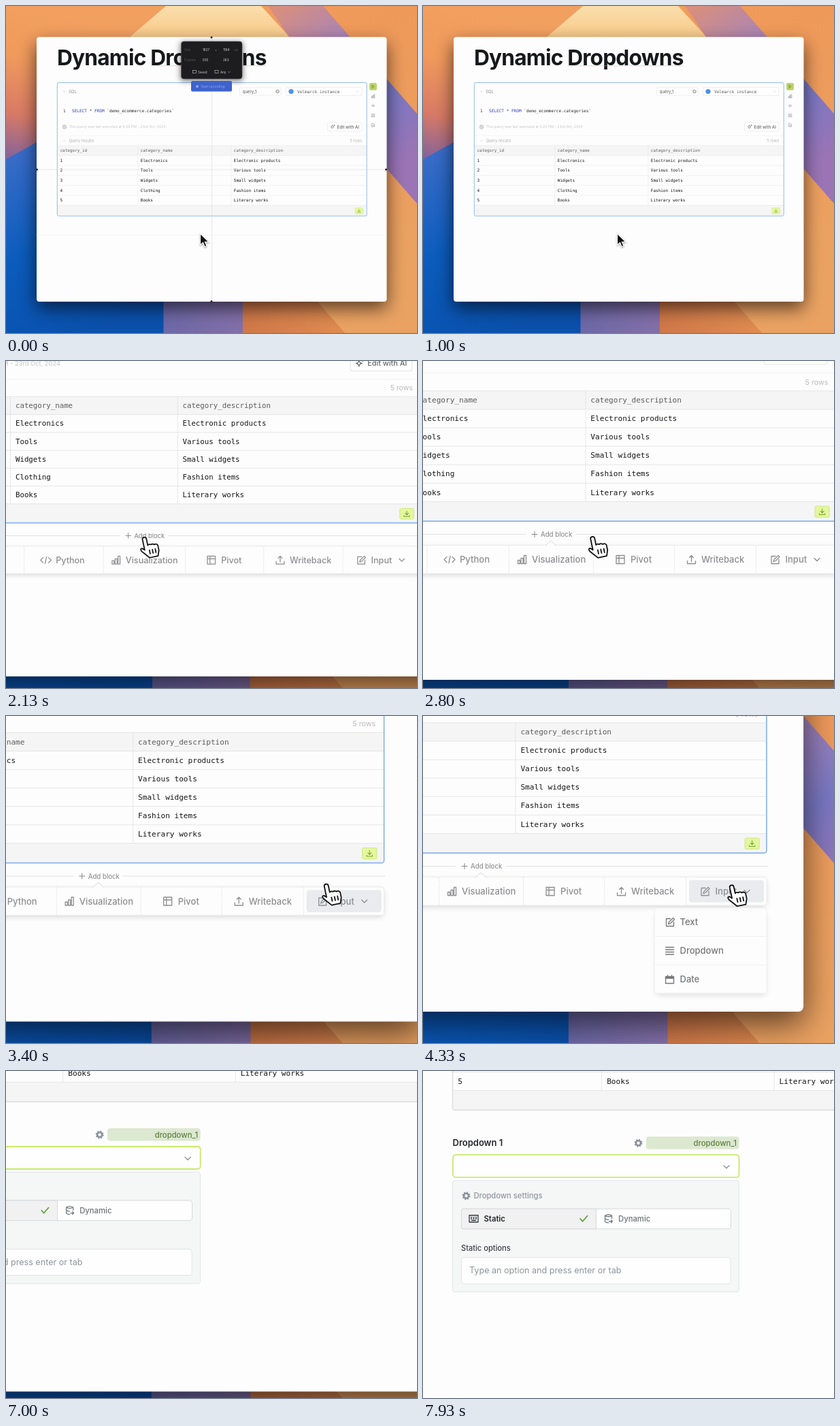
An HTML page for the animation above (8 s loop, 604x480 px).

```html
<!DOCTYPE html>
<html lang="en">
<head>
<meta charset="utf-8">
<title>Dynamic Dropdowns</title>
<style>
  html, body { margin: 0; height: 100%; overflow: hidden; }
  svg { display: block; width: 100vw; height: 100vh; font-family: Inter, sans-serif; }
  text { white-space: pre; }
  .mono { font-family: "DejaVu Sans Mono", monospace; }
  .line { fill: none; stroke-linecap: round; stroke-linejoin: round; }
</style>
</head>
<body>
<script>
const LOOP = 8000, FPS = 15, ZOOM = 1.85;

// ---------- drawing helpers ----------
const text = (x, y, s, size, fill, attrs = '') =>
  `<text x="${x}" y="${y}" font-size="${size}" fill="${fill}" ${attrs}>${s}</text>`;
const mono = (x, y, s, fill, size = 6) => text(x, y, s, size, fill, 'class="mono"');
const rect = (x, y, w, h, fill, attrs = '') =>
  `<rect x="${x}" y="${y}" width="${w}" height="${h}" fill="${fill}" ${attrs}/>`;
const line = (d, color, width = .6, attrs = '') =>
  `<path class="line" d="${d}" stroke="${color}" stroke-width="${width}" ${attrs}/>`;
const poly = (points, fill) => `<polygon points="${points}" fill="${fill}"/>`;
const group = (id, content, attrs = '') => `<g id="${id}" ${attrs}>${content}</g>`;
const gradient = (id, [x1, y1, x2, y2], ...colors) =>
  `<linearGradient id="${id}" gradientUnits="userSpaceOnUse" x1="${x1}" y1="${y1}" x2="${x2}" y2="${y2}">` +
  colors.map((c, i) => `<stop offset="${i / (colors.length - 1)}" stop-color="${c}"/>`).join('') +
  '</linearGradient>';

const icons = {
  code: 'M-4-4l-4 4 4 4M4-4l4 4-4 4M1-5l-2 10',
  bars: 'M-6 6v-5h3v5zM-1.5 6v-8h3v8zM3 6v-12h3v12z',
  pivot: 'M-6-6h12v12h-12zM-6-2h12M-2-6v12',
  upload: 'M0 3v-9M-3-3l3-3 3 3M-6 2v4h12v-4',
  download: 'M0-5v7M-3-1l3 3 3-3M-5 3v2h10v-2',
  edit: 'M1-5h-6v11h11v-6M-2 3l1-3 6-6 2 2-6 6z',
  chevron: 'M-4-2l4 4 4-4',
  list: 'M-6-5h12M-6-1.5h12M-6 2h12M-6 5.5h12',
  calendar: 'M-6-4h12v10h-12zM-6-1.5h12M-6-3h12M-3-6v2M3-6v2',
  type: 'M-5-5h10M0-5v10',
  check: 'M-5 0l3.5 4 7-8',
  keyboard: 'M-6.5-5h13v10h-13zM-4-2h1M-.5-2h1M3-2h1M-4 0h1M-.5 0h1M3 0h1M-3 2.5h6',
  database: 'M-5-4.5q5-3 10 0q-5 3-10 0v9q2 1.5 5 1.5M5-4.5v4M-5 0q2 1.5 5 1.5M1 4h5M4 2l2 2-2 2',
  sparkle: 'M-1-5q.5 4.5 5 5-4.5.5-5 5-.5-4.5-5-5 4.5-.5 5-5zM5-6v3M3.5-4.5h3',
  eye: 'M-6 0q6-8 12 0-6 8-12 0M-1.5 0h3',
  play: 'M-3-5l7 5-7 5z',
  note: 'M-5-6h7l3 3v9h-10zM-2 0h4M-2 3h4'
};
const icon = (name, x, y, color, size = 1, width = 1.3) =>
  line(icons[name], color, width, `transform="translate(${x} ${y}) scale(${size})"`);
const gear = (x, y, color, size = 1) =>
  `<g transform="translate(${x} ${y}) scale(${size})" fill="none" stroke="${color}">
   <circle r="3.7" stroke-width="2.8"/><circle r="5.5" stroke-width="1.6" stroke-dasharray="2.16"/></g>`;

// ---------- wallpaper: rays fanning out from the top centre ----------
const wallpaper =
  rect(-9, -9, 622, 498, 'url(#warm)') +
  rect(-9, -9, 241, 498, 'url(#left)') +
  poly('165,60 235,0 375,0 430,60', 'url(#sand)') +
  poly('385,0 466,0 604,158 604,290 508,180', 'url(#violet)') +
  poly('0,225 45,200 232,300 232,480 0,480', 'url(#blue)') +
  rect(231.5, 300, 118, 180, 'url(#slate)') +
  poly('348,300 428,400 498,480 348,480', 'url(#clay)');

// ---------- notebook page ----------
const rows = [
  ['1', 'Electronics', 'Electronic products'],
  ['2', 'Tools', 'Various tools'],
  ['3', 'Widgets', 'Small widgets'],
  ['4', 'Clothing', 'Fashion items'],
  ['5', 'Books', 'Literary works']
];
const columns = [79.5, 197.8, 334.8], ROW = 14.64, TABLE_TOP = 204.8;
const cells = (values, i, color) =>
  values.map((v, c) => mono(columns[c], TABLE_TOP + ROW * (i + .5) + 2, v, color)).join('');

const table =
  rect(75.5, TABLE_TOP, 454.5, ROW, '#f5f5f5') +
  rect(75.5, TABLE_TOP + 6 * ROW, 454.5, 15, '#f5f5f5') +
  cells(['category_id', 'category_name', 'category_description'], 0, '#5c5c5e') +
  rows.map((r, i) => cells(r, i + 1, '#141416')).join('') +
  [...Array(7).keys()].map(i => line(`M75.5 ${TABLE_TOP + i * ROW}h454.5`, '#e4e4e6', .5)).join('') +
  line(`M193.7 ${TABLE_TOP}v${6 * ROW}M330.8 ${TABLE_TOP}v${6 * ROW}`, '#e4e4e6', .5) +
  rect(513, 296.3, 11.4, 8.8, '#e4f79f', 'rx="1" stroke="#cbe878" stroke-width=".5"') +
  icon('download', 518.7, 300.7, '#79a232', .45);

const sql = '<tspan fill="#2f3fc4">SELECT</tspan> * <tspan fill="#2f3fc4">FROM</tspan> `demo_ecommerce.categories`';
const queryBlock =
  rect(75.5, 112.5, 454.5, 195.7, '#fdfdfd', 'rx="2"') +
  icon('chevron', 86, 125.5, '#aaa', .4) + text(92, 127.7, 'SQL', 6, '#8e8e90') +
  rect(343.5, 120, 60.5, 11, '#fff', 'rx="1.5" stroke="#e2e2e4" stroke-width=".6"') +
  text(347.8, 127.6, 'query_1', 6, '#555') + gear(399, 125.5, '#aaa', .5) +
  rect(411.5, 119.5, 111.5, 12, '#fff', 'rx="1.5" stroke="#e2e2e4" stroke-width=".6"') +
  '<circle cx="419" cy="125.5" r="3.6" fill="#4f8fe6"/>' +
  mono(428, 127.6, 'Velmarck instance', '#555', 6.1) +
  icon('chevron', 516.5, 125.5, '#aaa', .35) +
  mono(84, 156.2, '1', '#333') + mono(97, 156.2, sql, '#2a2a2c', 6.08) +
  '<circle cx="86" cy="177.5" r="3.3" fill="#cfcfd1"/>' + icon('check', 86, 177.5, '#fff', .3, 2) +
  text(92.5, 179.3, 'This query was last executed at 5:20 PM - 23rd Oct, 2024', 5.2, '#c6c6c8') +
  rect(472.5, 171, 50.5, 12.8, '#fff', 'rx="2" stroke="#e4e4e6" stroke-width=".6"') +
  icon('sparkle', 480, 177.5, '#666', .5) + text(486.5, 179.6, 'Edit with AI', 6.05, '#666', 'font-weight="500"') +
  line('M75.5 190.5h454.5', '#efeff0', .5) +
  icon('chevron', 86, 198, '#bbb', .4) + text(92.5, 199.8, 'Query results', 5.8, '#b2b2b4') +
  text(523.5, 199.8, '5 rows', 5.8, '#b9b9bb', 'text-anchor="end"') +
  table +
  rect(75.3, 112.5, 454.9, 195.7, 'none', 'id="frame" rx="2" stroke-width=".9"');

const sidebar =
  rect(534.5, 113.3, 10, 10, '#b9d565', 'rx="1.5" stroke="#a8cf68" stroke-width=".6"') +
  icon('play', 539.5, 118.3, '#7a5a30', .45) +
  ['bars', 'eye', 'list', 'note'].map((n, i) => icon(n, 539.5, 132.2 + 14.2 * i, '#85858a', .4)).join('');

const title = text(75, 87, 'Dynamic Dropdowns', 31.65, '#17181c', 'font-weight="700" letter-spacing="-.025em"') +
  line('M213 87.8h170', '#eda3b4', .7, 'stroke-dasharray="1 1.5"');

// Zoomed panels are laid out in enlarged pixels, then placed back on the page.
const placed = (x, y) => `transform="scale(${1 / ZOOM}) translate(${x} ${y})"`;

const addBlock = line('M-337 220.5H48M122 220.5H506', '#e2e0e1', 1) +
  line('M57 220.5h8M61 216.5v8', '#888', 1) + text(70, 224, 'Add block', 9.7, '#808084');

const tool = (name, label, x, tx) => icon(name, x, 257.5, '#8e8e92') +
  text(tx, 262, label, 13, '#8e8e92', 'font-weight="500"');
const toolbar =
  rect(-336, 240, 840, 40, '#000', 'rx="5" opacity=".16" style="filter:blur(4px)"') +
  rect(-337, 236.5, 842, 41.5, '#fdfdfd', 'rx="4" stroke="#ececee"') +
  '<path d="M77 237l8-7 8 7" fill="#fdfdfd" stroke="#e4e4e6"/>' +
  line('M-217 237v40M-97 237v40M23.5 237v40M147.5 237v40M266.5 237v40M386.5 237v40', '#e6e6e8', 1, 'stroke-dasharray="1.5 2"') +
  rect(391, 241, 110, 32.5, '#e9ebee', 'id="inputHover" rx="4"') +
  tool('type', 'Text', -302, -287) + tool('list', 'Query', -186, -171) + tool('code', 'Python', -64, -49) +
  tool('bars', 'Visualization', 42.5, 57) + tool('pivot', 'Pivot', 187, 202) +
  tool('upload', 'Writeback', 291.5, 306) + tool('edit', 'Input', 414, 429.5) +
  icon('chevron', 476, 257.5, '#8e8e92');

const option = (name, label, y) => icon(name, 362.5, y, '#3c3d42') +
  text(377.5, y + 4.6, label, 13, '#3c3d42', 'font-weight="500"');
const menu =
  rect(342, 288, 162, 122, '#000', 'rx="5" opacity=".18" style="filter:blur(5px)"') +
  rect(340.5, 281.5, 164.5, 125.5, '#fdfdfd', 'rx="4" stroke="#ececee"') +
  rect(340.5, 323, 164.5, 42, '#e9ebee', 'id="dropdownHover"') +
  line('M341 323.5h164M341 365.5h164', '#ececee', 1) +
  option('edit', 'Text', 302.5) + option('list', 'Dropdown', 344.5) + option('calendar', 'Date', 386.5);

const dropdownBlock =
  text(43.5, 110, 'Dropdown 1', 13, '#24262b', 'font-weight="600"') + gear(316.5, 105.5, '#8b929c', .95) +
  rect(328, 96, 136.5, 18.5, '#dce8d0', 'rx="4"') +
  text(461, 109.5, 'dropdown_1', 11.3, '#5f8040', 'text-anchor="end" font-weight="500"') +
  rect(44, 122.8, 420.5, 33, '#fefefe', 'rx="4" stroke="#c3e75a" stroke-width="1.6"') +
  icon('chevron', 446, 140.5, '#8b9098') +
  rect(43.5, 160.5, 421, 163.5, '#f5f6f6', 'rx="4" stroke="#e3e5e7"') +
  gear(63.5, 183, '#8d939c', .95) + text(74.5, 187, 'Dropdown settings', 11.2, '#9096a0', 'font-weight="500"') +
  rect(56.5, 202, 396, 29.5, '#fefefe', 'rx="4" stroke="#d6d9dd"') +
  '<path d="M254.5 202H60.5q-4 0-4 4v21.5q0 4 4 4h194z" fill="#f0f1f0" stroke="#d6d9dd"/>' +
  icon('keyboard', 74.5, 216.5, '#33363c') + text(89.5, 220.7, 'Static', 11.3, '#24262b', 'font-weight="600"') +
  icon('check', 236, 216.5, '#639a3a', 1, 1.7) +
  icon('database', 272.5, 216.5, '#777b82') + text(287, 220.7, 'Dynamic', 11.3, '#6d7178', 'font-weight="500"') +
  text(56, 263.5, 'Static options', 11.1, '#3d4047', 'font-weight="500"') +
  rect(56.5, 273.5, 395.5, 38.5, '#fefefe', 'rx="4" stroke="#e2e4e7"') +
  text(68, 297.2, 'Type an option and press enter or tab', 12.6, '#8e939b');

// ---------- capture overlay ----------
const label = (x, y, s, fill) => text(x, y, s, 4.6, fill);
const overlay =
  line('M302.5 46v388M45 240h514', '#d8d8d8', .6) + line('M45 336.5h514', '#f2f2f2', .6) +
  [[302, 46], [302, 433.5], [45.5, 240], [558.5, 240]].map(([x, y]) => `<circle cx="${x}" cy="${y}" r="1.5" fill="#222"/>`).join('') +
  rect(256, 53, 92, 57, '#000', 'rx="4" opacity=".5" style="filter:blur(4px)"') +
  rect(257.5, 52, 89.5, 55, '#1d1d1f', 'rx="4" stroke="#555" stroke-width=".6"') +
  label(262, 66, 'Size', '#555') + label(289, 66, '1827', '#ddd') + label(307, 66, '×', '#888') +
  label(319, 66, '1164', '#ddd') + label(336, 66, 'px', '#555') +
  label(262, 81, 'Position', '#555') + label(289, 81, '505', '#ddd') + label(319, 81, '263', '#ddd') +
  rect(274.5, 94.5, 5, 4, 'none', 'stroke="#ccc" stroke-width=".6"') + label(282, 98.5, 'Saved', '#ccc') +
  rect(307, 94.5, 5, 4, 'none', 'stroke="#ccc" stroke-width=".6"') + label(315, 98.5, 'Any', '#ccc') +
  icon('chevron', 328, 97, '#ccc', .4) +
  rect(272, 110, 60, 15.5, '#3f63cc', 'rx="2"') +
  '<circle cx="281" cy="118" r="2" fill="#8fa8ea"/>' + text(304, 120, 'Start recording', 5, '#8fa8ea', 'text-anchor="middle"');

const arrow = '<path d="M0 0v17l4-3.7 2.6 6.2 2.9-1.2-2.6-6h5.6z" fill="#111" stroke="#fff" stroke-width="1.2" style="filter:drop-shadow(0 1px 1px #0006)"/>';
const hand = `<g transform="scale(${1 / ZOOM}) rotate(-12)" stroke="#111" stroke-width="1.8" stroke-linejoin="round">
  <path fill="#fff" d="M-3 3Q-3 0 0 0Q3 0 3 3V13Q5 11 8 13Q10 11.5 13 14Q16 12.5 18 16V24L15 32H2L-8 20Q-10 15-6 16L-3 19Z"/>
  <path fill="none" d="M4 20v7M8.5 20v7M13 20v7"/></g>`;

document.body.innerHTML = `<svg viewBox="0 0 604 480" preserveAspectRatio="none"><defs>` +
  gradient('warm', [100, 0, 500, 480], '#f4a05c', '#ee995a', '#e9a262') +
  gradient('left', [60, 0, 0, 240], '#f2a060', '#f09a5c', '#d87a66', '#6f5ca8') +
  gradient('sand', [300, 0, 300, 60], '#fadfac', '#f7c27e') +
  gradient('violet', [400, 0, 575, 235], '#d98f7c', '#a884b8', '#7878c4', '#9a74b4') +
  gradient('blue', [0, 220, 120, 480], '#3a6cc8', '#0b5cbc', '#0a50ac') +
  gradient('slate', [232, 0, 350, 0], '#6c68a6', '#8470a8') +
  gradient('clay', [348, 0, 490, 0], '#cf7848', '#de8a50') +
  `<clipPath id="windowClip">${rect(45, 45.5, 514.5, 388.5, '#000', 'rx="4"')}</clipPath></defs>` +
  group('wall', wallpaper) +
  group('camera',
    rect(44, 56, 516, 388, '#000', 'rx="6" opacity=".6" style="filter:blur(13px)"') +
    rect(45, 45.5, 514.5, 388.5, '#fdfdfd', 'rx="4"') +
    `<g clip-path="url(#windowClip)">` + group('page',
      title + queryBlock + sidebar +
      group('add', addBlock, placed(476, 369)) + group('bar', toolbar, placed(476, 369)) +
      group('options', menu, placed(476, 369)) + group('block', dropdownBlock, placed(95.75, 513))) + '</g>' +
    group('overlay', overlay) +
    group('cursor', group('arrow', arrow) + group('hand', hand))) +
  '</svg>';

// ---------- motion ----------
// Each key is [time, ...values].
const cameraKeys = [
  [1250, 1, 0, 0], [2130, 1.791, -340, -314.3], [2450, 1.85, -370, -333], [2800, 1.85, -373, -335],
  [3400, 1.85, -425.3, -354.5], [3850, 1.85, -475.3, -369], [5000, 1.85, -476.3, -369],
  [6350, 1.85, -476.3, -369], [7600, 1.85, -95.75, -300]
];
const cursorKeys = [
  [1250, 285.5, 334], [1750, 303.2, 320], [2550, 303.2, 320], [3400, 484, 325],
  [3700, 502.2, 333.7], [4750, 502.2, 333.7], [5450, 500, 386.5]
];
const scrollKeys = [[6150, 0], [7200, 115]];

// Smooth interpolation through the keys without overshoot.
function track(keys, t) {
  const last = keys.length - 1;
  if (t <= keys[0][0]) return keys[0].slice(1);
  if (t >= keys[last][0]) return keys[last].slice(1);
  const i = keys.findIndex(k => k[0] > t) - 1;
  const span = keys[i + 1][0] - keys[i][0], u = (t - keys[i][0]) / span;
  return keys[i].slice(1).map((a, j) => {
    const c = j + 1, b = keys[i + 1][c];
    const slope = n => (keys[n + 1][c] - keys[n][c]) / (keys[n + 1][0] - keys[n][0]);
    const tangent = n => {
      if (n === 0 || n === last) return 0;
      const p = slope(n - 1), q = slope(n);
      return p * q <= 0 ? 0 : 2 * p * q / (p + q);
    };
    const v = u * u * (3 - 2 * u);
    return a + (b - a) * v + span * u * (1 - u) * ((1 - u) * tangent(i) - u * tangent(i + 1));
  });
}

const byId = id => document.getElementById(id);
const fade = (t, from, to) => Math.min(1, Math.max(0, (t - from) / (to - from)));
const show = (id, opacity) => byId(id).setAttribute('opacity', +opacity);
const move = (id, value) => byId(id).setAttribute('transform', value);

function draw(t) {
  const [scale, ox, oy] = track(cameraKeys, t);
  const [cx, cy] = track(cursorKeys, t);
  const [scroll] = track(scrollKeys, t);
  const inserted = t >= 6100;
  const wallScale = 1 + .25 * (scale - 1) / (ZOOM - 1);

  move('wall', `translate(302 240) scale(${wallScale}) translate(-302 -240)`);
  move('camera', `translate(${ox} ${oy}) scale(${scale})`);
  move('page', `translate(0 ${-scroll})`);
  move('cursor', `translate(${cx} ${cy})`);

  const pointing = t >= 1700 && !inserted;
  show('hand', pointing);
  show('arrow', !pointing);
  show('overlay', 1 - fade(t, 60, 330));
  show('add', inserted ? 0 : fade(t, 1600, 1750));
  show('bar', inserted ? 0 : fade(t, 1850, 2050));
  show('options', inserted ? 0 : fade(t, 4070, 4450));
  show('block', fade(t, 6100, 6300));
  show('inputHover', cx > 466 && cy < 350);
  show('dropdownHover', cy > 374.5);
  byId('frame').setAttribute('stroke', inserted ? '#e0e0e2' : '#8ab4ea');
}

function tick(now) {
  const t = now % LOOP;
  draw(Math.floor((t + 5) * FPS / 1000) * 1000 / FPS);
  requestAnimationFrame(tick);
}
draw(0);
requestAnimationFrame(tick);
</script>
</body>
</html>
```
